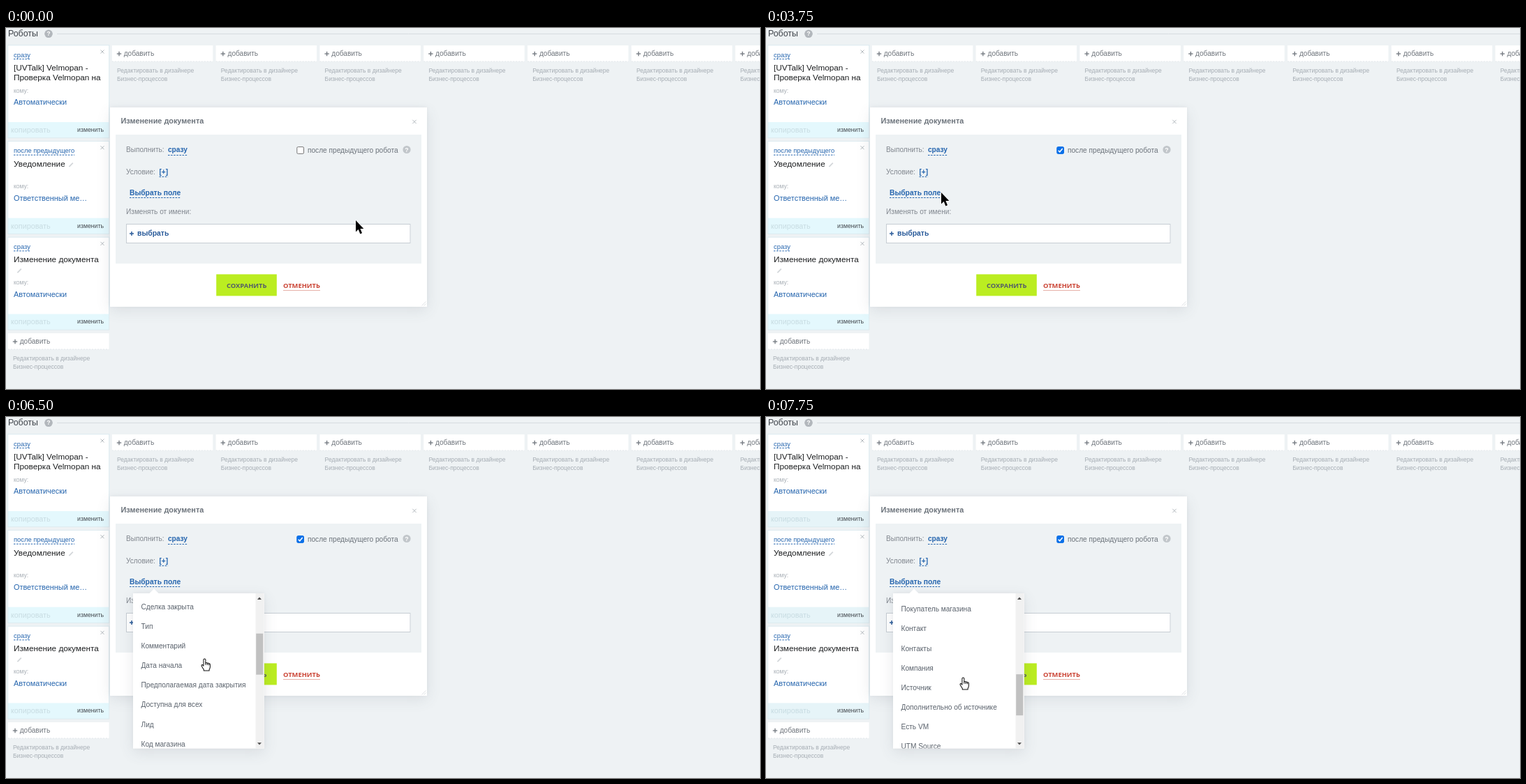
An HTML page with a canvas for the animation above (8000 ms loop, 1080x518 px).

```html
<!DOCTYPE html>
<html lang="ru">
<head>
<meta charset="utf-8">
<title>Роботы</title>
<style>
html, body { margin: 0; width: 100%; height: 100%; overflow: hidden; background: #eef2f4; }
canvas { display: block; width: 100%; height: 100%; }
</style>
</head>
<body>
<canvas id="stage" width="1080" height="518"></canvas>
<script>
const ctx = document.getElementById('stage').getContext('2d');
const LOOP = 8000, STEP = 250;
const SANS = '"Liberation Sans", Arial, sans-serif';
const OPEN = '"Open Sans", sans-serif';
const BG = '#eef2f4', LINK = '#2565ae', LABEL = '#80868e', MUTED = '#a6adb4';

const ITEMS = ['Название', 'Сумма', 'Валюта', 'Валюта учета', 'Вероятность,%', 'Ответственный',
  'Сделка закрыта', 'Тип', 'Комментарий', 'Дата начала', 'Предполагаемая дата закрытия',
  'Доступна для всех', 'Лид', 'Код магазина', 'Покупатель магазина', 'Контакт', 'Контакты',
  'Компания', 'Источник', 'Дополнительно об источнике', 'Есть VM', 'UTM Source', 'UTM Medium'];

// Pointer stops: time, x, y
const POINTER = [[0, 501, 276], [250, 456, 229], [500, 437, 204], [750, 425, 189], [1000, 420, 178],
  [1250, 419.5, 175.5], [3500, 377, 199], [3750, 251, 236], [4000, 240.5, 241], [5500, 262, 283],
  [5750, 275, 312], [6000, 280, 327], [6250, 283, 337], [6500, 285, 347], [6750, 285.5, 355],
  [7000, 285, 363], [7250, 284, 369], [7500, 283.5, 372], [7750, 283, 374]];

// Scroll stops, linear between them: time, offset
const SCROLL = [[5750, 0], [6000, 60], [6750, 224.3], [7250, 312.8], [7750, 391.3]];

function rect(x, y, w, h, color) {
  ctx.fillStyle = color;
  ctx.fillRect(x, y, w, h);
}

function text(str, x, y, size, color, weight = 400, family = SANS) {
  ctx.font = `${weight} ${size}px ${family}`;
  ctx.fillStyle = color;
  ctx.fillText(str, x, y);
  return ctx.measureText(str).width;
}

function line(points, color, width = 1, dash = []) {
  ctx.strokeStyle = color;
  ctx.lineWidth = width;
  ctx.setLineDash(dash);
  ctx.beginPath();
  points.forEach(([x, y], i) => i ? ctx.lineTo(x, y) : ctx.moveTo(x, y));
  ctx.stroke();
  ctx.setLineDash([]);
}

function polygon(points, color) {
  ctx.fillStyle = color;
  ctx.beginPath();
  points.forEach(([x, y]) => ctx.lineTo(x, y));
  ctx.fill();
}

function link(str, x, y, size, weight, underline, color = LINK) {
  const w = text(str, x, y, size, color, weight);
  line([[x, underline], [x + w, underline]], color, 1, [2.5, 1.6]);
}

// White panel with a wide shadow below and a thin one around
function popup(x, y, w, h) {
  for (const [alpha, blur, dy] of [[0.12, 19, 6.3], [0.06, 5.4, -1]]) {
    ctx.shadowColor = `rgba(83,92,105,${alpha})`;
    ctx.shadowBlur = blur;
    ctx.shadowOffsetY = dy;
    rect(x, y, w, h, '#fff');
  }
  ctx.shadowColor = 'transparent';
}

function cross(x, y, r, color) {
  line([[x - r, y - r], [x + r, y + r]], color);
  line([[x + r, y - r], [x - r, y + r]], color);
}

function plus(x, y, r, color, width) {
  line([[x - r, y], [x + r, y]], color, width);
  line([[x, y - r], [x, y + r]], color, width);
}

function help(x, y, r, color) {
  ctx.fillStyle = color;
  ctx.beginPath();
  ctx.arc(x, y, r, 0, 7);
  ctx.fill();
  ctx.textAlign = 'center';
  text('?', x, y + 3.1, 8.8, '#fff', 700);
  ctx.textAlign = 'left';
}

function pencil(x, y) {
  line([[x - 2.6, y + 2.6], [x + 2.8, y - 2.8]], '#d3d7da', 1.8);
}

function addBlock(x, y, textX) {
  rect(x, y, 144.5, 23, '#fff');
  line([[x, y + 23], [x + 144.5, y + 23]], '#e3e8eb', 1, [2, 2]);
  plus(textX + 3, y + 12, 3.2, '#70767d', 1.3);
  text('добавить', textX + 9.7, y + 15, 10.1, '#70767d');
  text('Редактировать в дизайнере', textX, y + 38.5, 8.53, MUTED);
  text('Бизнес-процессов', textX, y + 51, 8.53, MUTED);
}

function card(y, when, titles, who, footer) {
  rect(3, y, 144.5, 132.5, '#fff');
  rect(3, y + 110, 144.5, 22.5, footer);
  ctx.strokeStyle = '#dcebf0';
  ctx.lineWidth = 1;
  ctx.strokeRect(2.7, y - 0.3, 145, 133);
  cross(138, y + 9, 2.5, '#b3b9be');
  link(when, 11, y + 16.5, 9.4, 400, y + 19.5);
  titles.forEach((s, i) => text(s, 11, y + 36 + i * 14, 11.77, '#1d1f21'));
  text('кому:', 11, y + 67.5, 8.5, MUTED);
  text(who, 11, y + 85.2, 10.9, LINK);
  text('копировать', 7, y + 124.8, 10.8, '#c8dce2');
  text('изменить', 102, y + 124, 8.75, '#44494e');
}

function board(t) {
  rect(0, 0, 1080, 518, BG);
  text('Роботы', 3, 12, 12.4, '#3e4349');
  help(61, 8.3, 5.8, '#b2b7bc');
  line([[73, 8.5], [1080, 8.5]], '#d6dbdf');
  for (let i = 0; i < 7; i++) {
    const x = 151.8 + i * 148.8;
    addBlock(x, 25, x + 7.2);
  }
  const footer = t < 7500 ? '#e4f8fd' : '#e6f4f8';
  card(25, 'сразу', ['[UVTalk] Velmopan -', 'Проверка Velmopan на'], 'Автоматически', footer);
  card(162.7, 'после предыдущего', ['Уведомление'], 'Ответственный ме…', footer);
  card(300.4, 'сразу', ['Изменение документа'], 'Автоматически', footer);
  pencil(93, 196.5);
  pencil(19, 348.5);
  addBlock(3, 438, 10);
}

function checkbox(t) {
  const checked = t >= 2750;
  let edge = '#767676';
  if (t >= 1000) edge = '#4f4f4f';
  if (t >= 2500) edge = '#8d8d8d';
  if (checked) edge = t < 3500 ? '#005cc8' : '#0b70e8';
  ctx.beginPath();
  ctx.roundRect(416.8, 170.6, 9.7, 9.8, 1.6);
  ctx.fillStyle = checked ? edge : '#fff';
  ctx.fill();
  ctx.strokeStyle = edge;
  ctx.lineWidth = 1;
  ctx.stroke();
  if (checked) line([[418.7, 175.7], [420.8, 177.8], [424.7, 173]], '#fff', 1.5);
}

function dialog(t) {
  popup(149, 114, 454, 286);
  text('Изменение документа', 164.5, 137, 10.87, '#6d747c', 700);
  cross(585, 134.5, 2.7, '#b3b9be');
  rect(157, 153, 438, 185, BG);

  text('Выполнить:', 172, 178, 10.1, LABEL);
  link('сразу', 232, 178, 10.1, 700, 182.5);
  checkbox(t);
  text('после предыдущего робота', 432, 178.5, 10.15, '#6b727a');
  help(574, 174.5, 5.6, '#c1c6ca');
  text('Условие:', 172, 210, 10.1, LABEL);
  link('[+]', 219.5, 210, 10.1, 700, 213.5);
  link('Выбрать поле', 177, 239.7, 10.3, 700, 243.5);
  text('Изменять от имени:', 172, 267, 10.1, LABEL);

  rect(172, 281, 407.5, 28, '#fff');
  ctx.strokeStyle = '#c6cdd3';
  ctx.strokeRect(172.5, 281.5, 406.5, 27);
  plus(180, 295, 3, '#2a5b9a', 1.5);
  text('выбрать', 188, 298, 10.4, '#2a5b9a', 700);

  rect(301.2, 353.4, 86.6, 31, '#bbed21');
  text('СОХРАНИТЬ', 316, 372.7, 9.4, '#535c69', 700, OPEN);
  const w = text('ОТМЕНИТЬ', 397, 372.7, 9.4, '#cb4536', 700, OPEN);
  line([[397, 376.5], [397 + w, 376.5]], '#e6b0a8');
  for (const d of [3, 6]) line([[601.5 - d, 398.5], [601.5, 398.5 - d]], '#dfe3e6');
}

function scrollAt(t) {
  if (t <= SCROLL[0][0]) return 0;
  for (let i = 1; i < SCROLL.length; i++) {
    const [t0, a] = SCROLL[i - 1], [t1, b] = SCROLL[i];
    if (t <= t1) return a + (b - a) * (t - t0) / (t1 - t0);
  }
  return SCROLL[SCROLL.length - 1][1];
}

function menu(t) {
  const top = scrollAt(t), pitch = 28.17;
  popup(182, 253, 187.5, 222.5);
  polygon([[205, 253.5], [212, 246.5], [219, 253.5]], '#fff');

  ctx.save();
  ctx.beginPath();
  ctx.rect(182, 253, 175.5, 222.5);
  ctx.clip();
  ITEMS.forEach((s, i) => {
    const y = 272.5 + i * pitch - top;
    if (y > 240 && y < 490) text(s, 193.5, y + 3.6, 10.15, '#5a626c');
  });
  ctx.restore();

  rect(357.5, 253, 12, 222.5, '#f1f1f1');
  rect(358.2, 266 + top * 0.2637, 10, 59, '#c1c1c1');
  polygon([[360, 262], [363, 258.6], [366, 262]], top ? '#505050' : '#a3a3a3');
  polygon([[360, 467.2], [363, 470.6], [366, 467.2]], '#505050');
}

const ARROW = new Path2D('M0 0V16.5L3.7 13L6.3 19.4L9 18.3L6.4 12.1H11.3Z');
const HAND = new Path2D('M-1.6 1Q0-1 1.6 1V6Q3 5 4.2 6.6Q5.6 5.7 6.6 7.3Q8.4 6.6 8.6 8.6V12' +
  'Q8.4 14.5 7.2 15.8V17.5H-1.2V15.8Q-3 13.5-4.6 10.6Q-5 8.4-3.2 8.9L-1.6 10.4Z');
const FINGERS = new Path2D('M1.6 6V9M4.2 6.8V9.3M6.6 7.5V9.6');

function pointer(t) {
  const [, x, y] = POINTER.filter(p => p[0] <= t).pop();
  const hand = t >= 4000;
  ctx.save();
  ctx.translate(x, y);
  ctx.lineJoin = 'round';
  ctx.lineWidth = 1.1;
  ctx.strokeStyle = hand ? '#111' : '#fff';
  ctx.fillStyle = hand ? '#fff' : '#000';
  if (hand) {
    ctx.translate(-0.6, 0);
    ctx.scale(0.93, 0.97);
    ctx.fill(HAND);
    ctx.stroke(HAND);
    ctx.stroke(FINGERS);
  } else {
    ctx.stroke(ARROW);
    ctx.fill(ARROW);
  }
  ctx.restore();
}

function draw(now) {
  const t = Math.floor((now % LOOP) / STEP) * STEP;
  board(t);
  dialog(t);
  if (t >= 4750) menu(t);
  pointer(t);
}

let start;
function tick(now) {
  start ??= now;
  draw(now - start);
  requestAnimationFrame(tick);
}
draw(0);
requestAnimationFrame(tick);
</script>
</body>
</html>
```
